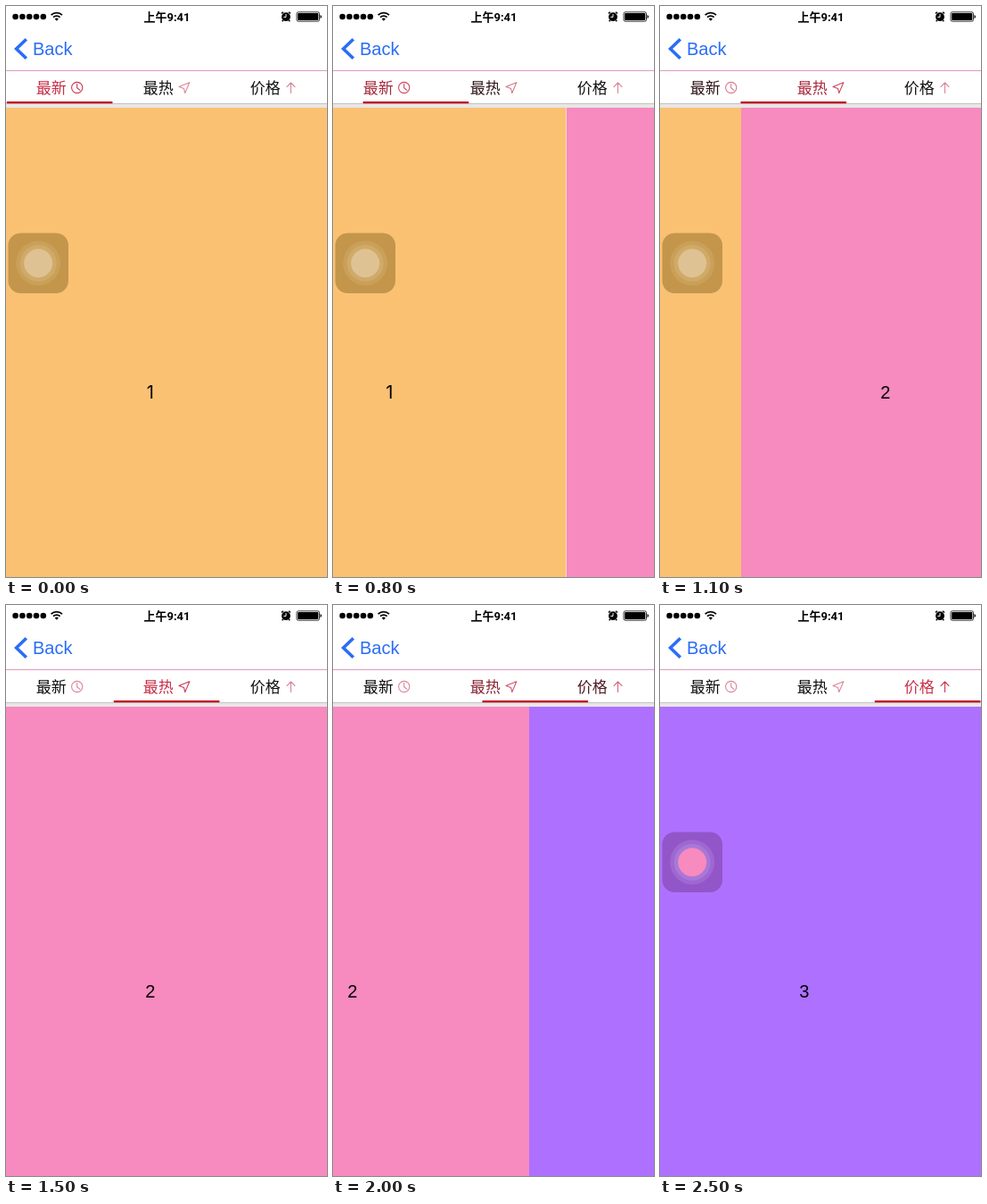
An HTML page that plays this animation: 360 px wide and 640 px high, repeating every 2600 ms.

```html
<!DOCTYPE html>
<html lang="zh">
<head>
<meta charset="utf-8">
<style>
html, body { margin: 0; width: 100%; height: 100%; overflow: hidden; background: #fff; }
svg { display: block; }
text { font-family: "Liberation Sans", "Noto Sans CJK SC", "Noto Sans CJK", sans-serif; }
.digit { font: 20px Inter, sans-serif; text-anchor: middle; }
.digit.plain { font-family: "Liberation Sans", sans-serif; }
.time { font: bold 13px Roboto, "Noto Sans CJK SC", "Noto Sans CJK", sans-serif; text-anchor: middle; }
.tab text { font-size: 17px; }
.tab path { fill: none; stroke-width: 1.1; stroke-linejoin: round; stroke-linecap: round; }
</style>
</head>
<body>
<svg id="stage" width="360" height="640" viewBox="0 0 360 640">
  <g id="pages"></g>
  <rect width="360" height="110" fill="#fff"/>
  <rect y="72" width="360" height="1" fill="#dc9cc0"/>
  <rect y="109" width="360" height="1" fill="#c2c2c2"/>
  <rect y="110" width="360" height="4" fill="#e9e6e6"/>

  <g id="dots"></g>
  <g fill="none" stroke="#000" stroke-width="1.7">
    <path d="M50.6 10.2a8.6 8.6 0 0 1 12.4 0M53 12.7a5.3 5.3 0 0 1 7.6 0"/>
    <path d="M56.8 16.8l-2.1-2.2a3 3 0 0 1 4.2 0z" fill="#000" stroke="none"/>
  </g>
  <text class="time" x="180.5" y="16.7">上午9:41</text>
  <circle cx="314" cy="12.2" r="4.9"/>
  <path d="M309 8.4l2-1.7M319 8.4l-2-1.7M310.7 16l-1 1.2M317.3 16l1 1.2" stroke="#000" stroke-width="1.5"/>
  <path d="M314 9v3.4h-2.6" fill="none" stroke="#fff"/>
  <rect x="326" y="6.8" width="25.5" height="10.4" rx="1.8" fill="none" stroke="#000" stroke-width=".8"/>
  <rect x="327.2" y="8" width="23.1" height="8" rx=".8"/>
  <path d="M352.5 10v4q1.5-.5 1.5-2t-1.5-2"/>

  <path d="M22.8 37.2L11.6 48l11.2 10.8" fill="none" stroke="#2a6df6" stroke-width="3.6"/>
  <text x="30" y="54.8" font-size="20" fill="#2a6df6">Back</text>
  <g id="tabs"></g>
  <rect id="bar" y="107" width="119" height="2.3" rx="1" fill="#c40a22"/>
</svg>
<script>
const byId = id => document.getElementById(id);
const LOOP = 2600, STEP = 100, WIDTH = 360;

const button = ([box, ring, disc, core]) => `<g class="button">
  <rect x="2.5" y="254.5" width="67.5" height="67.5" rx="14" fill="${box}"/>
  <circle cx="36.2" cy="288.3" r="25" fill="${ring}"/>
  <circle cx="36.2" cy="288.3" r="20.5" fill="${disc}"/>
  <circle cx="36.2" cy="288.3" r="16" fill="${core}"/></g>`;

// The floating button shows only over the first and last page.
const pages = [
  ["#fac173", ["#c3964c", "#caa059", "#d0aa68", "#dfc293"]],
  ["#f78abf"],
  ["#ae70ff", ["#9256c8", "#9f67d0", "#a878d8", "#f78abf"]]
];
byId("pages").innerHTML = pages.map(([color, tones], i) =>
  `<svg class="page" width="360" height="640"><rect width="360" height="640" fill="${color}"/>
  ${tones ? button(tones) : ""}<text class="digit${i ? " plain" : ""}" x="161.7" y="440">${i + 1}</text></svg>`).join("");

const tabs = [
  ["最新", "M73.6 91.5a6.1 6.1 0 1 0 12.2 0a6.1 6.1 0 1 0-12.2 0M79.7 87.5v4.3l3.2 2.6"],
  ["最热", "M205.8 85.7L194 90.6l5.5 1.8 1.3 5.2z"],
  ["价格", "M319.5 97.5V86M315 90.6l4.5-4.6 4.5 4.6"]
];
byId("tabs").innerHTML = tabs.map(([label, icon], i) =>
  `<g class="tab"><text x="${33.7 + 120 * i}" y="98">${label}</text><path d="${icon}"/></g>`).join("");

byId("dots").innerHTML = [0, 1, 2, 3, 4].map(i =>
  `<circle cx="${10.6 + 7.8 * i}" cy="12" r="3.3"/>`).join("");

// Scroll offset at each step of the two swipes
const swipes = [
  [6, 0, [12, 52, 98.5, 150, 206, 269, 341, 360]],
  [16, 360, [362, 369, 383, 408, 500, 615, 681, 707, 717, 720]]
];
function offsetAt(step) {
  const [first, rest, stops] = swipes[step < swipes[1][0] ? 0 : 1];
  return step < first ? rest : stops[Math.min(step - first, stops.length - 1)];
}

const mix = (from, to, k) => `rgb(${from.map((v, i) => v + (to[i] - v) * k)})`;
const pageNodes = document.querySelectorAll(".page");
const tabNodes = document.querySelectorAll(".tab");
const start = performance.now();

function draw(now) {
  const time = Math.max(0, now - start) % LOOP;
  const offset = offsetAt(Math.floor(time / STEP));
  pageNodes.forEach((page, i) => {
    const x = i * WIDTH - offset;
    page.setAttribute("x", x);
    page.querySelector(".button")?.setAttribute("transform", `translate(${-x})`);
  });
  tabNodes.forEach((tab, i) => {
    const near = Math.max(0, 1 - Math.abs(offset / WIDTH - i));
    const k = near * near * (3 - 2 * near);
    tab.firstChild.setAttribute("fill", mix([17, 17, 17], [200, 48, 72], k));
    tab.lastChild.setAttribute("stroke", mix([218, 132, 152], [204, 52, 78], k));
  });
  byId("bar").setAttribute("x", 0.6 + offset / 3);
  requestAnimationFrame(draw);
}
draw(start);
</script>
</body>
</html>
```
